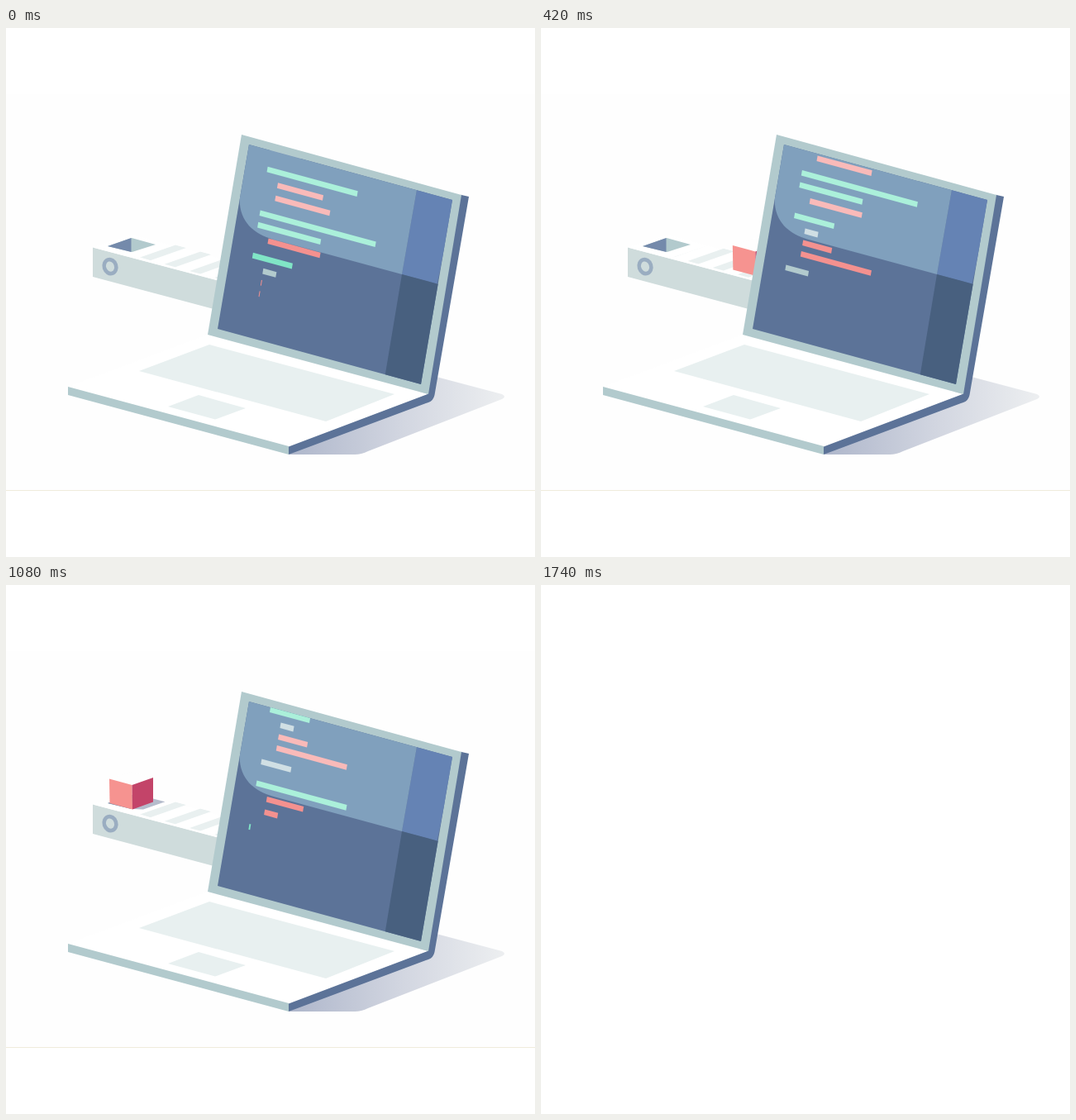
An HTML page for the animation above (1770 ms loop, 640 by 640 pixels).

```html
<!DOCTYPE html>
<html lang="en">
<head>
<meta charset="utf-8">
<title>Laptop and conveyor</title>
<style>
  html, body { margin: 0; width: 100%; height: 100%; overflow: hidden; background: #fff; }
  svg { display: block; width: 100vw; height: 100vh; }
</style>
</head>
<body>
<svg viewBox="0 0 640 640">
  <defs>
    <linearGradient id="floorShade" gradientUnits="userSpaceOnUse" x1="350" y1="0" x2="600" y2="0">
      <stop offset="0" stop-color="#b0b8cc"/>
      <stop offset=".5" stop-color="#d1d5e0"/>
      <stop offset="1" stop-color="#eceef0"/>
    </linearGradient>
    <clipPath id="screenClip"><path d="M294 141L540 208L502 431L256 364Z"/></clipPath>
    <clipPath id="glossClip"><path d="M294 135L498 190L479 298L324 256C299 249 283 234 282.6 208L280 135Z"/></clipPath>
    <clipPath id="beltClip"><path d="M205 262.3L300 288V320L161 277Z"/></clipPath>
    <clipPath id="holeClip"><path d="M100 200H200V255L180 262L152.5 271.3L123 264L100 258Z"/></clipPath>
  </defs>

  <g id="scene">
    <rect y="80" width="640" height="480" fill="#fefefe"/>
    <rect y="559" width="640" height="1" fill="#efecdc"/>

    <!-- conveyor -->
    <path d="M105 265.5L270 309V345L105 301Z" fill="#cfdcdc"/>
    <path d="M105 265.5L152 250L300 290V317Z" fill="#fff"/>
    <ellipse cx="126" cy="288.6" rx="7.2" ry="8.6" transform="rotate(-18 126 288.6)" fill="none" stroke="#9aadc1" stroke-width="4.6"/>
    <g clip-path="url(#beltClip)"><g id="belt" fill="#e9f0f0"/></g>
    <path d="M123 264L152 254L181 262L152.5 271Z" fill="#b2cacd"/>
    <path d="M123 264L151.5 254V271Z" fill="#748aab"/>

    <g id="cubeFrame">
      <g id="cube">
        <path id="cubeShade" d="M153 271L178 258.5L192.5 262.2L166 271.5Z" fill="#b5bccc"/>
        <path d="M125 234.5L151 226L178 233L152.5 242Z" fill="#fefefe"/>
        <path d="M125 234.5L152.5 242L153 271.5L125.5 264Z" fill="#f69390"/>
        <path d="M152.5 242L178 233V262.5L153 271.5Z" fill="#c34469"/>
      </g>
    </g>

    <!-- laptop -->
    <path d="M75 434L244 371L511 443L342 507Z" fill="#fff"/>
    <path d="M515 420.5L600 443Q606 446 600 449L438 512Q430 516 422 516H342L500 440Z" fill="url(#floorShade)"/>
    <path d="M75 434L244 371L511 443L342 507Z" fill="#fff"/>
    <path d="M75 434L342 506V516L75 444Z" fill="#b2cacd"/>
    <path d="M246 383L470 443L387 476L161 415Z" fill="#e8f0f0"/>
    <path d="M233 444L290 460L253 473.5L196 458Z" fill="#e8f0f0"/>
    <path d="M550 201.7L560 204L518.5 444Q517 451 511 453L342 516V506.5L510 443Z" fill="#5c7398"/>
    <path d="M285 129L551 202L511 443L244 371Z" fill="#b2cacd"/>
    <g clip-path="url(#screenClip)">
      <rect x="250" y="135" width="300" height="300" fill="#5c7398"/>
      <path d="M498 190L545 200L521.5 309.5L479 298Z" fill="#6583b4"/>
      <path d="M479 298L525 310.4L505 440L457 430Z" fill="#48607f"/>
      <g class="code"/>
      <g clip-path="url(#glossClip)">
        <rect x="250" y="135" width="300" height="200" fill="#80a0bd"/>
        <g class="code"/>
      </g>
    </g>
  </g>
</svg>
<script>
const LOOP = 1770, CYCLE = 1680, LAST_POSE = 1650, BLANK_AT = 1740, STEP = 30;
const SCROLL = 193.5, REPEAT_SHIFT = 1.4, PITCH = 30.3, SLOPE = .266;
const PALETTES = [
  { green: '#80e5c6', pink: '#f4918f', gray: '#b2cacd' },
  { green: '#abf0da', pink: '#f9bab9', gray: '#d0dfe4' }
];
// row, indent, length, colour, typing start, typing duration
const LINES = [
  [22.9, 26, 109, 'green', 695, 370],
  [38.3, 41, 55, 'pink', 830, 310],
  [53.9, 41, 66, 'pink', 1000, 330],
  [75.6, 26, 140, 'green', 1075, 380],
  [90, 26, 76, 'green', 1270, 370],
  [105.6, 41, 63, 'pink', 1325, 320],
  [127, 26, 48, 'green', 1390, 280],
  [142, 41, 16, 'gray', 1500, 175],
  [156, 41, 35, 'pink', 1670, 370],
  [169.5, 41, 85, 'pink', 1676, 370],
  [190, 26, 36, 'gray', 136, 370]
];

const byId = id => document.getElementById(id);
const clamp = (x, lo = 0, hi = 1) => Math.min(hi, Math.max(lo, x));
const mod = (x, m) => ((x % m) + m) % m;
const put = (node, attrs) => {
  for (const key in attrs) node.setAttribute(key, attrs[key]);
  return node;
};
const add = (parent, tag, attrs) =>
  put(parent.appendChild(document.createElementNS('http://www.w3.org/2000/svg', tag)), attrs);

const [scene, belt, cube, cubeFrame, cubeShade] =
  ['scene', 'belt', 'cube', 'cubeFrame', 'cubeShade'].map(byId);

for (let i = -2; i < 4; i++) {
  const x = 205 + i * PITCH, y = 262.5 + i * PITCH * SLOPE;
  add(belt, 'path', { d: `M${x} ${y}l13 3.5l-43.5 15.3l-13 -3.5Z` });
}

const bars = [...document.querySelectorAll('.code')].map((layer, i) => {
  put(layer, { transform: 'matrix(1 .2724 -.1704 1 294 141)' });
  return LINES.map(([, , , colour]) =>
    add(layer, 'rect', { height: 6.6, fill: PALETTES[i][colour] }));
});

function drawCode(t) {
  LINES.forEach(([row, indent, length, , start, duration], i) => {
    const age = mod(t - start, CYCLE);
    const firstTop = row - SCROLL * start / CYCLE;
    const repeated = firstTop < 0 && t >= start;
    const x = indent - (repeated ? REPEAT_SHIFT : 0);
    const y = mod(firstTop, SCROLL) - SCROLL * age / CYCLE - 3.3;
    const width = length * clamp(age / duration);
    bars.forEach(layer => put(layer[i], { x, y, width }));
  });
}

function drawConveyor(t) {
  const progress = clamp((t - 40) / 1040);
  const left = 5 * PITCH * (1 + Math.cos(Math.PI * progress)) / 2;
  const shift = left % PITCH;
  put(belt, { transform: `translate(${shift} ${shift * SLOPE})` });

  const drop = 39 * (Math.max(0, t - 1090) / 230) ** 2;
  put(cube, {
    transform: `translate(${left} ${left * SLOPE + drop})`,
    visibility: drop > 50 ? 'hidden' : 'visible'
  });
  put(cubeFrame, { 'clip-path': drop ? 'url(#holeClip)' : 'none' });
  put(cubeShade, { opacity: clamp(1 - drop / 8) });
}

function draw(ms) {
  const t = Math.floor(mod(ms, LOOP) / STEP) * STEP;
  put(scene, { opacity: t >= BLANK_AT ? 0 : 1 });
  const pose = Math.min(t, LAST_POSE);
  drawCode(pose);
  drawConveyor(pose);
}

const begin = performance.now();
function tick() {
  draw(performance.now() - begin);
  requestAnimationFrame(tick);
}
tick();
</script>
</body>
</html>
```
